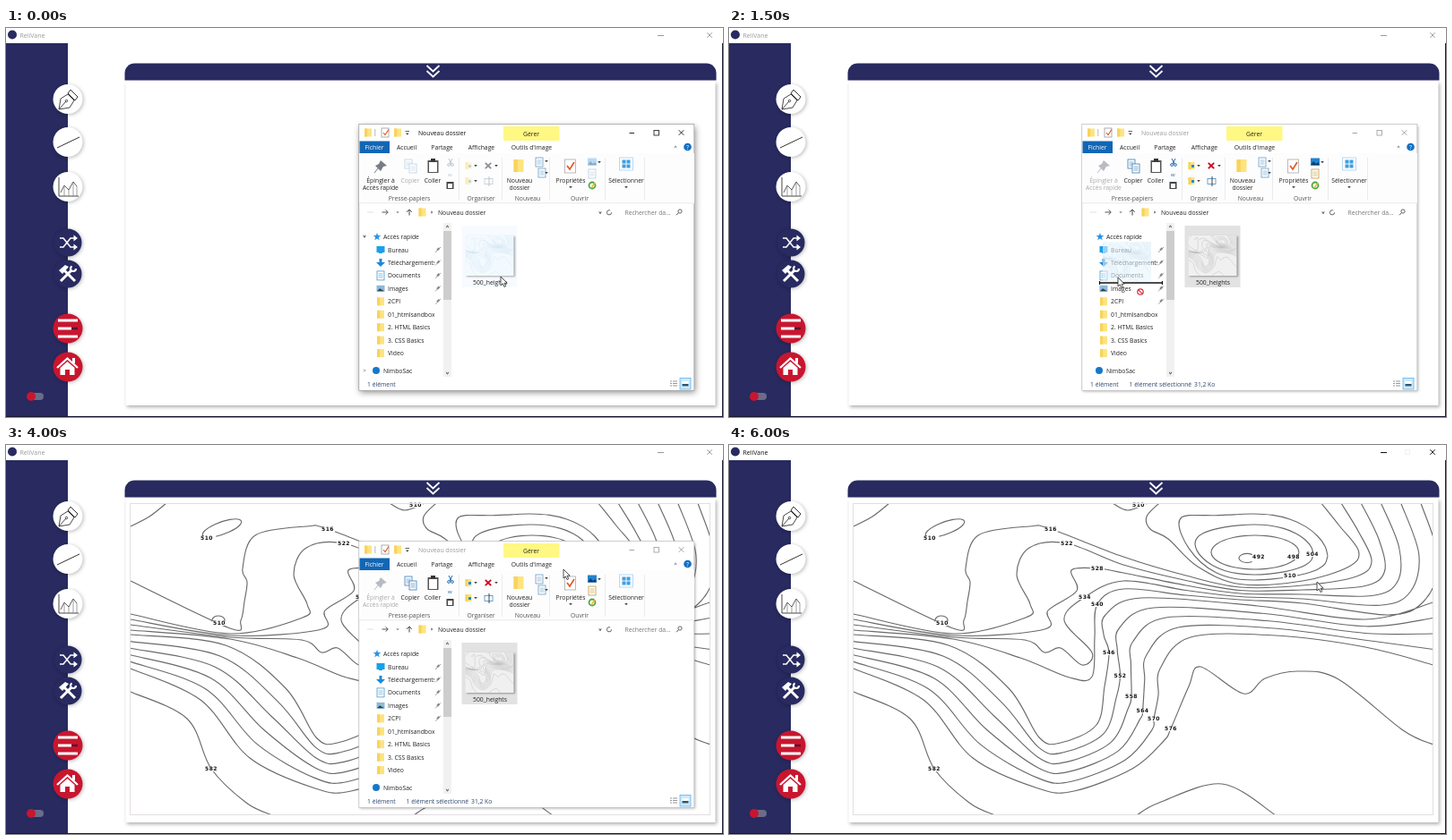
These frames come from a looping animation (800 px wide and 435 px high, 7.1 s). An HTML page with a canvas:

```html
<!DOCTYPE html>
<html lang="fr">
<head>
<meta charset="utf-8">
<title>Contour map import</title>
<style>
html, body { margin: 0; width: 100%; height: 100%; overflow: hidden; background: #fff; }
canvas { display: block; }
</style>
</head>
<body>
<canvas id="stage" width="800" height="435"></canvas>
<script>
const LOOP = 7100, STEP = 100;
const SELECTED = 400, INACTIVE = 500, DRAG = 1000, COPYABLE = 1100, LEAVE = 1700;
const LOADED = 2500, MINIMISE = 4800, GONE = 5200;
const NAVY = '#282a60', RED = '#c8162f', FOLDER = '#fde47f', BLUE = '#1e88d8', INK = '#222';
const screen = document.getElementById('stage').getContext('2d');
const layer = document.createElement('canvas');
layer.width = 800;
layer.height = 435;
const layerCtx = layer.getContext('2d');
let g = screen;

// Drawing helpers
function box(x, y, w, h, color) {
  g.fillStyle = color;
  g.fillRect(x, y, w, h);
}
function frame(x, y, w, h, color, width = 0.8) {
  g.strokeStyle = color;
  g.lineWidth = width;
  g.strokeRect(x, y, w, h);
}
function disc(x, y, r, color) {
  g.fillStyle = color;
  g.beginPath();
  g.arc(x, y, r, 0, 7);
  g.fill();
}
function ring(x, y, r, color, width = 0.9, to = 7) {
  g.strokeStyle = color;
  g.lineWidth = width;
  g.beginPath();
  g.arc(x, y, r, 0, to);
  g.stroke();
}
function trace(p) {
  g.beginPath();
  for (let i = 0; i < p.length; i += 2) g.lineTo(p[i], p[i + 1]);
}
function line(color, width, ...p) {
  trace(p);
  g.strokeStyle = color;
  g.lineWidth = width;
  g.stroke();
}
function poly(color, ...p) {
  trace(p);
  g.fillStyle = color;
  g.fill();
}
function pill(x, y, w, h, r, color) {
  g.fillStyle = color;
  g.beginPath();
  g.roundRect(x, y, w, h, r);
  g.fill();
}
function text(s, x, y, color = INK, align = 'left', size = 6.8) {
  g.font = `${size}px "Open Sans", "Noto Sans", sans-serif`;
  g.textAlign = align;
  g.textBaseline = 'alphabetic';
  g.fillStyle = color;
  g.fillText(s, x, y + 2.5);
}
function centred(s, x, y, color) {
  s.split('\n').forEach((row, i) => text(row, x, y + 8 * i, color, 'center'));
}
function shadow(alpha, blur, dx, dy, draw) {
  g.save();
  g.shadowColor = `rgba(0,0,0,${alpha})`;
  g.shadowBlur = blur;
  g.shadowOffsetX = dx;
  g.shadowOffsetY = dy;
  draw();
  g.restore();
}
function clipped(x, y, w, h, draw) {
  g.save();
  g.beginPath();
  g.rect(x, y, w, h);
  g.clip();
  draw();
  g.restore();
}
function faded(alpha, draw) {
  g.globalAlpha = alpha;
  draw();
  g.globalAlpha = 1;
}
function caret(x, y, color = '#444') {
  poly(color, x - 1.8, y - 1, x + 1.8, y - 1, x, y + 1.2);
}
function chevron(x, y, dx, dy, color) {
  line(color, 0.9, x - dx - dy, y - dy - dx, x + dx, y + dy, x - dx + dy, y - dy + dx);
}
function cross(x, y, r, color, width = 0.9) {
  line(color, width, x - r, y - r, x + r, y + r);
  line(color, width, x + r, y - r, x - r, y + r);
}
function folder(x, y, w = 8, h = 9) {
  box(x - w / 2, y - h / 2, w, h, FOLDER);
  box(x - w / 2, y - h / 2, w * 0.4, h, '#f8d35e');
}
function page(x, y, color) {
  box(x, y, 8, 10, '#fff');
  frame(x, y, 8, 10, color);
  for (let i = 3; i < 9; i += 2) line(color, 0.6, x + 1.5, y + i, x + 6.5, y + i);
}

// Contour map: curves through a few points, families blended between two
const MAP = { x: 138, y: 65, w: 648, h: 349 };
const contours = new Path2D();
const labels = [];
const mix = (a, b, s) => a.map((v, i) => v + (b[i] - v) * s);
const label = (height, x, y) => labels.push([height, x, y]);

function curve(...p) {
  const n = p.length / 2;
  const at = i => {
    const j = Math.max(0, Math.min(n - 1, i)) * 2;
    return [p[j], p[j + 1]];
  };
  contours.moveTo(p[0], p[1]);
  for (let i = 0; i < n - 1; i++) {
    const [a, b, c, d] = [at(i - 1), at(i), at(i + 1), at(i + 2)];
    contours.bezierCurveTo(
      b[0] + (c[0] - a[0]) / 6, b[1] + (c[1] - a[1]) / 6,
      c[0] - (d[0] - b[0]) / 6, c[1] - (d[1] - b[1]) / 6, c[0], c[1]);
  }
}
function oval(x, y, rx, ry, tilt, from, to) {
  contours.moveTo(x + rx * Math.cos(from) * Math.cos(tilt) - ry * Math.sin(from) * Math.sin(tilt),
    y + rx * Math.cos(from) * Math.sin(tilt) + ry * Math.sin(from) * Math.cos(tilt));
  contours.ellipse(x, y, rx, ry, tilt, from, to);
}

function buildBasin() {
  oval(578, 126.5, 9, 5, 0, 0.9, 5.4);
  for (let k = 0; k < 3; k++) {
    const p = [];
    for (let i = 0; i <= 24; i++) {
      const a = i * Math.PI / 12, c = Math.cos(a);
      const pull = 5 * k * Math.max(0, c) ** 3 - 6.5 * k * k * Math.max(0, -c) ** 3;
      p.push(587 - k + (49 + 17 * k) * c, 120 - 3 * k + (19 + 9 * k) * Math.sin(a) + pull);
    }
    curve(...p);
  }
  label(492, 591, 125);
  label(498, 630, 125);
  label(504, 651, 122);
  label(510, 626, 146);
}

function buildSlopes() {
  const upper = [440,125, 510,146, 570,159, 640,157, 700,147, 717,130, 703,98, 683,65];
  const lower = [440,161, 510,168, 570,173, 640,177, 735,190, 775,175, 792,130, 772,65];
  const east = k => mix(upper, lower, k / 4);
  const climb = (k, ...p) => {
    const [x, y] = p.slice(-2);
    curve(139, k ? 183 + 6 * k : 152, 250, k ? 209 + 2 * k : 205, ...p, ...east(k));
    label(516 + 6 * k, x, y);
  };
  curve(480,65, 466,80, 470,94, 490,105, 523,136, ...east(-1).slice(4));
  climb(0, 262,196, 266,175, 269,153, 264,138, 278,101, 335,91, 359,94);
  climb(1, 331,193, 336,178, 321,145, 335,115, 377,110);
  climb(2, 352,206, 356,185, 388,163, 382,140, 411,138);
  climb(3, 330,218, 352,232, 370,227, 394,246, 405,232, 374,196, 397,170);
  climb(4, 325,238, 380,260, 405,259, 408,215, 411,178);
}

function buildValley() {
  const innerWest = [139,212, 245,224, 312,272, 346,327, 370,333, 410,313, 419,270];
  const outerWest = [139,250, 217,285, 272,350, 345,384, 385,387, 450,362, 485,331];
  const innerEast = [418,212, 420,190, 460,171, 590,180, 710,195, 786,176];
  const outerEast = [479,280, 481,250, 515,215, 610,213, 710,226, 786,246];
  for (let k = 0; k < 5; k++) {
    const x = 424 + 12.5 * k, y = 232 + 75 * Math.sin(0.35 * k);
    curve(...mix(innerWest, outerWest, k / 5), x, y, ...mix(innerEast, outerEast, k / 4));
    label(546 + 6 * k, x, y);
  }
  curve(...outerWest, 493,317, 513,270, 526,248, 574,278, 598,261, 635,253, 680,262, 752,319, 786,335);
  label(576, 493, 317);
}

function buildMap() {
  buildBasin();
  buildSlopes();
  buildValley();
  curve(139,91, 160,80, 179,65);
  curve(428,65, 445,73, 467,65);
  curve(139,276, 202,306, 229,362, 268,400, 297,414);
  curve(455,414, 480,400, 550,379, 610,414);
  oval(241, 93, 23, 7, -0.35, -3.4, 2);
  oval(237, 196, 7, 5, 0, 2.8, 6.6);
  label(510, 224, 104);
  label(510, 457, 67);
  label(510, 238, 199);
  label(582, 229, 362);
}

function drawMap() {
  const { x, y, w, h } = MAP;
  box(x, y, w, h, '#fff');
  clipped(x, y, w, h, () => {
    g.strokeStyle = '#6a6a6a';
    g.lineWidth = 1.15;
    g.stroke(contours);
  });
  g.font = 'bold 6px "DejaVu Sans", sans-serif';
  g.letterSpacing = '0.5px';
  g.textAlign = 'center';
  g.textBaseline = 'alphabetic';
  for (const [height, lx, ly] of labels) {
    box(lx - 8, ly - 2, 16, 5, '#fff');
    g.fillStyle = '#111';
    g.fillText(height, lx, ly + 2.4);
  }
  g.letterSpacing = '0px';
  frame(x + 0.5, y + 0.5, w - 1, h - 1, '#e3dde3', 1);
}

function thumbnail(x, y, tint, ink, depth = 0.35) {
  shadow(depth, 2, 1, 1, () => box(x, y, 54, 45, tint));
  clipped(x, y, 54, 45, () => {
    g.translate(x, y);
    g.scale(54 / MAP.w, 45 / MAP.h);
    g.translate(-MAP.x, -MAP.y);
    g.strokeStyle = ink;
    g.lineWidth = 4;
    g.stroke(contours);
  });
}

// Application
function roundButton(y, r, color) {
  shadow(0.28, 4, 1, 1, () => disc(69, y, r, color));
}

function drawTools() {
  roundButton(79.5, 16.5, '#fff');
  line('#333', 0.9, 59, 91, 61, 79, 69, 74, 76, 81, 71, 89, 59, 91, 67, 82);
  ring(67.5, 81.5, 1.2, '#333');
  line('#333', 1, 69, 73, 72, 69, 80, 77, 77, 81, 69, 73);
  roundButton(127.5, 16.5, '#fff');
  line('#333', 1, 57, 134, 82, 122);
  roundButton(177.5, 16.5, '#fff');
  line('#333', 0.9, 59, 167, 59, 188, 81, 188);
  line('#333', 0.8, 61, 184, 65, 176, 70, 181, 75, 172, 79, 177);
  for (const [x, y] of [[65, 176], [70, 181], [75, 172], [79, 177]]) line('#777', 0.7, x, y, x, 188);
}

function drawActions() {
  roundButton(240, 15.5, NAVY);
  for (const d of [-5, 5]) {
    line('#fff', 1.6, 60, 240 + d, 64, 240 + d, 72, 240 - d, 77, 240 - d);
    poly('#fff', 75.5, 236.5 + d, 80, 240 + d, 75.5, 243.5 + d);
  }
  roundButton(275, 15.5, NAVY);
  line('#fff', 3, 64, 270, 77, 283);
  line('#fff', 3, 61, 283, 73, 271);
  ring(75, 269, 3, '#fff', 2.2, 4.2);
  poly('#fff', 59, 271, 66, 265, 70, 267, 63, 275);
  roundButton(336, 16.5, RED);
  for (const d of [-9, 0, 9]) line('#fff', 3, 58, 336 + d, d ? 80 : 73, 336 + d);
  line('#5c1230', 2.5, 73, 336, 80, 336);
  roundButton(379, 16.5, RED);
  line('#fff', 2.2, 57, 380, 68.5, 369.5, 80, 380);
  box(74, 369, 3, 6, '#fff');
  poly('#fff', 60.5, 380, 68.5, 373, 76.5, 380, 76.5, 388, 60.5, 388);
  box(66, 382, 5, 6, RED);
  pill(27, 408, 15, 8, 4, '#6b6c88');
  disc(28, 412, 5, RED);
}

function drawApp(t) {
  const active = t >= MINIMISE;
  const ink = active ? '#111' : '#999';
  box(0, 0, 800, 435, '#fff');
  disc(7, 7.5, 5, NAVY);
  text('ReliVane', 15.5, 8, ink, 'left', 7);
  line(ink, 1, 727, 8.5, 734, 8.5);
  if (active) frame(754.5, 5.5, 5, 5, '#eee');
  cross(785, 8, 2.8, ink);
  box(0, 17, 69, 417, NAVY);
  drawTools();
  drawActions();

  shadow(0.32, 4, 1, 1.5, () => box(133.5, 60, 658, 362, '#fff'));
  box(120, 56, 680, 3, '#fff');
  pill(132.5, 39.5, 660, 19, [11, 11, 0, 0], NAVY);
  for (const y of [42, 48]) line('#fff', 1.8, 469.5, y, 476.5, y + 6.5, 483.5, y);
  if (t >= LOADED) drawMap();
  box(0, 434, 800, 1, '#15172f');
  box(799, 17, 1, 418, '#15172f');
}

// File explorer
function drawRibbon(copyable) {
  const hot = (on, off) => copyable ? on : off;
  const pin = hot('#b8bcc2', '#767d85');
  const copy = hot('#3b7db5', '#b9d2e6');
  const cut = hot('#1b67ad', '#b8c4d0');
  const dim = hot(1, 0.3);
  box(394, 140, 374, 56, '#fdfdfe');
  box(394, 195.5, 374, 0.8, '#e2e4e8');
  for (const x of [505, 553, 606, 668, 712]) box(x, 145, 0.7, 47, '#e1e3e6');

  poly(pin, 418, 148, 425, 154, 421, 155, 418, 160, 412, 154, 416, 152);
  line(pin, 1, 415, 157, 411, 162);
  page(445, 147, copy);
  page(450, 152, copy);
  box(470.5, 148, 12, 14, '#555');
  box(472, 150, 9, 11, '#fff');
  box(474, 146, 5, 3.5, '#333');
  for (const d of [-1, 1]) {
    line(cut, 1, 496 + 2 * d, 146, 496 - d, 152);
    ring(496 + 2 * d, 153, 1.4, cut);
  }
  text('w', 493, 163, cut, 'left', 6);
  box(491.5, 172, 8, 8, '#444');
  box(493, 174, 5, 5, '#fff');

  for (const y of [154, 171]) {
    faded(dim, () => {
      folder(516, y, 7, 8);
      box(516, y - 1, 3, 3, BLUE);
    });
    caret(524, y);
  }
  cross(538, 154, 3.2, hot('#d0021b', '#8a9096'), 1.8);
  caret(547, 154);
  frame(534, 168.5, 9, 6, hot('#4a8cc2', '#bccbd8'));
  line(hot('#333', '#bbb'), 0.9, 539, 166, 539, 177);

  folder(572, 154, 11, 14);
  page(591, 145, '#6a9cc4');
  page(594, 157, '#6a9cc4');
  caret(603, 149);
  caret(603, 162);

  box(624, 148, 12, 14, '#fff');
  frame(623.5, 147, 12, 15, '#aaa');
  line('#e2592a', 1.7, 626, 154, 629, 158, 634, 150);
  faded(dim, () => {
    box(649, 145.5, 10, 8, '#2383cf');
    poly('#0c3d70', 649, 153.5, 652, 149, 655, 152, 657, 150, 659, 153.5);
  });
  caret(662, 150);
  page(650, 158, hot('#c09a40', '#b5cddd'));
  ring(654, 176, 3.5, '#49a942', 1.8);
  line('#f1b52a', 1.4, 653, 179, 657, 173);
  for (let i = 0; i < 4; i++) box(687.5 + (i % 2) * 5, 147.5 + (i >> 1) * 5, 4, 4, '#3f9fe0');
  frame(684.5, 145, 15, 14, '#a9d3f1');

  centred('Épingler à\nAccès rapide', 418, 170, hot('#aaa', INK));
  centred('Copier', 451, 170, hot(INK, '#aaa'));
  centred('Coller', 476, 170);
  centred('Nouveau\ndossier', 573, 170);
  for (const [name, x] of [['Propriétés', 630], ['Sélectionner', 692]]) {
    centred(name, x, 170);
    caret(x, 178);
  }
  for (const [name, x] of [['Presse-papiers', 450], ['Organiser', 530], ['Nouveau', 582], ['Ouvrir', 640]]) {
    centred(name, x, 190, '#555');
  }
}

const treeIcons = {
  Bureau(y) {
    box(413.5, y - 4, 9, 7, '#18a0ec');
    box(416, y + 3, 4, 1, '#18a0ec');
  },
  Téléchargements(y) {
    box(416.5, y - 4.5, 3, 4, BLUE);
    poly(BLUE, 413, y - 0.5, 423, y - 0.5, 418, y + 4.5);
  },
  Documents(y) {
    page(414, y - 5, '#4a9aca');
  },
  Images(y) {
    box(413.5, y - 3.5, 9, 7, '#8bbbd8');
    poly('#345', 414, y + 3, 417, y, 422, y + 3);
  }
};
const tree = [...Object.keys(treeIcons), '2CPI', '01_htmlsandbox', '2. HTML Basics', '3. CSS Basics', 'Video'];

function drawTree(t) {
  if (t < COPYABLE) {
    chevron(400, 233, 0, 1.3, t < INACTIVE ? '#444' : '#aaa');
    chevron(400, 383, 1.3, 0, '#aaa');
  }
  const star = [];
  for (let i = 0; i < 10; i++) {
    const r = i % 2 ? 1.9 : 4.6, a = i * Math.PI / 5 - Math.PI / 2;
    star.push(414 + r * Math.cos(a), 233.5 + r * Math.sin(a));
  }
  poly('#2a93e8', ...star);
  text('Accès rapide', 421, 233.5);
  tree.forEach((name, i) => {
    const y = 248 + i * 14.45;
    if (treeIcons[name]) treeIcons[name](y);
    else folder(418, y);
    clipped(425, y - 7, 53, 14, () => text(name, 426, y));
    if (i < 5) {
      line('#888', 2.2, 481, y + 0.5, 483.5, y - 2);
      line('#888', 0.8, 479, y + 3, 485, y - 3);
    }
  });
  disc(413, 383, 4, '#1678ca');
  text('NimboSac', 421, 383);
  box(488, 218, 9, 172, '#f1f1f1');
  box(488, 227, 9, 77, '#cdcdcd');
  chevron(492.5, 222, 0, -1.2, '#444');
  chevron(492.5, 386, 0, 1.2, '#444');
}

function drawFile(t) {
  const [back, tint, ink] =
    t >= COPYABLE ? ['#e2e2e2', '#f0f0f0', 'rgba(70,70,70,.32)'] :
    t >= SELECTED ? ['#d3ebff', '#dceffb', 'rgba(60,110,150,.32)'] :
    ['#f7fbff', '#f3faff', 'rgba(90,150,190,.22)'];
  box(508.5, 221, 62, 69, back);
  if (t >= SELECTED && t < COPYABLE) frame(508.5, 221.5, 62, 68, '#a5d6fb');
  thumbnail(512.5, 232, tint, ink);
  centred('500_heights', 540, 284);
}

function drawExplorer(t) {
  const active = t < INACTIVE;
  const ink = active ? '#111' : '#999';
  shadow(active ? 0.45 : 0.3, active ? 7 : 3, 1, active ? 2 : 1,
    () => box(394, 107.5, 374, 298, '#fff'));
  frame(393.8, 107.5, 374, 298, active ? '#999' : '#bbb', 0.7);

  // Title and tabs
  folder(404, 117);
  box(411.5, 113, 0.7, 8, '#999');
  box(419.5, 112.5, 7, 9, '#fff');
  frame(419, 112, 8, 10, '#999');
  line('#e2592a', 1.2, 421, 117, 423, 119.5, 427, 113.5);
  folder(437, 117);
  line('#333', 0.8, 445.5, 115.5, 450, 115.5);
  caret(447.8, 118.5);
  text('Nouveau dossier', 460, 117, ink);
  box(555, 110, 62.5, 16, '#fff883');
  centred('Gérer', 586, 118.5);
  line(ink, 0.9, 695.5, 117.5, 701, 117.5);
  frame(723, 114.5, 5.5, 5.5, ink);
  cross(753.5, 117, 2.8, ink);
  box(394.5, 126.5, 33.5, 13.5, '#1166b5');
  centred('Fichier', 411, 133, '#fff');
  for (const [name, x] of [['Accueil', 447], ['Partage', 486.5], ['Affichage', 530.5], ["Outils d'image", 586.5]]) {
    centred(name, x, 133);
  }
  chevron(747, 133, 0, -1.2, '#888');
  disc(760.5, 133, 4.3, '#0f70c4');
  centred('?', 760.5, 133, '#fff');
  drawRibbon(t >= COPYABLE);

  // Address bar
  line('#ddd', 0.9, 403, 206, 410, 206);
  line('#555', 1, 419.5, 206, 426, 206);
  line('#555', 1, 423.5, 203.3, 426.3, 206, 423.5, 208.7);
  chevron(437, 206, 0, 1, '#888');
  line('#444', 1, 450, 209.5, 450, 203);
  line('#444', 1, 447.2, 205.8, 450, 203, 452.8, 205.8);
  folder(464.5, 206);
  chevron(475, 206, 1, 0, '#666');
  text('Nouveau dossier', 482, 206);
  chevron(663, 206.5, 0, 1.2, '#444');
  ring(673, 206.3, 2.6, '#555', 0.9, 5.2);
  text('Rechercher da...', 690.5, 206, '#777');
  ring(752, 205, 2.1, '#555');
  line('#555', 1, 750.5, 206.6, 748, 209.2);

  drawTree(t);
  drawFile(t);

  // Status bar
  text('1 élément', 403, 398, '#2b456c');
  if (t >= SELECTED) {
    text('1 élément sélectionné', 446.5, 398, '#2b456c');
    text('31,2 Ko', 519, 398, '#2b456c');
  }
  for (let y = 395; y < 402; y += 2.5) {
    line('#888', 0.9, 741, y, 743, y);
    line('#888', 0.9, 744, y, 749, y);
  }
  box(752, 391.5, 12, 12.5, '#cce8ff');
  frame(752, 391.5, 12, 12.5, '#5cb4f0');
  box(754.5, 395, 7, 5.5, '#fff');
  box(754.5, 398, 7, 2.5, '#356');
}

function drawWindow(t) {
  g = layerCtx;
  g.clearRect(0, 0, 800, 435);
  drawExplorer(t);
  g = screen;
  if (t < MINIMISE) {
    g.drawImage(layer, 0, 0);
    return;
  }
  // Shrinks towards the task bar while fading
  const u = ((t - MINIMISE + STEP) / 300) ** 1.75;
  const k = 1 - 0.285 * u, w = 375 * k, h = 299 * k;
  const bottom = 406 + 9 * Math.min(u, 1);
  faded(Math.max(0.08, 1 - 0.7 * u), () =>
    g.drawImage(layer, 394, 107, 375, 299, 394 - 91 * u, bottom - h, w, h));
}

// Pointer moves: start, end, x, y
const MOVES = [
  [100, 700, 548, 274], [900, 1500, 434, 279], [1500, 2000, 339, 280],
  [3400, 4000, 622, 139], [4200, 4600, 701, 120], [5300, 5600, 656, 153]
];

function pointerAt(t) {
  let at = [552, 278];
  for (const [from, to, ...goal] of MOVES) {
    const s = Math.max(0, Math.min(1, (t - from) / (to - from)));
    at = mix(at, goal, 1 - (1 - s) ** 2);
  }
  return at;
}

function drawPointer(x, y) {
  const p = [0, 0, 0, 10, 2.3, 7.9, 4, 11.5, 5.7, 10.7, 4.1, 7.2, 7.2, 7.2, 0, 0]
    .map((v, i) => v + (i % 2 ? y : x));
  poly('#fff', ...p);
  line(INK, 0.8, ...p);
}

function drawDrag(x, y) {
  faded(0.6, () => thumbnail(x - 17, y - 40, '#e6f5fd', 'rgba(60,120,160,.25)', 0));
  if (x > 487) return;
  line('#111', 1.6, 413, 285, 484, 285);
  for (const end of [413.5, 483.5]) line('#111', 1.2, end, 283, end, 287);
  disc(x + 25, y + 16, 3.6, '#fff');
  ring(x + 25, y + 16, 3.2, '#d32b3a', 1.2);
  line('#d32b3a', 1.1, x + 22.8, y + 13.8, x + 27.2, y + 18.2);
}

function drawScene(t) {
  drawApp(t);
  if (t < GONE) drawWindow(t);
  const [x, y] = pointerAt(t);
  if (t >= DRAG && t < LEAVE) drawDrag(x, y);
  drawPointer(x, y);
}

buildMap();
const start = performance.now();
function tick() {
  const t = (performance.now() - start) % LOOP;
  drawScene(Math.floor(t / STEP) * STEP);
  requestAnimationFrame(tick);
}
tick();
</script>
</body>
</html>
```
